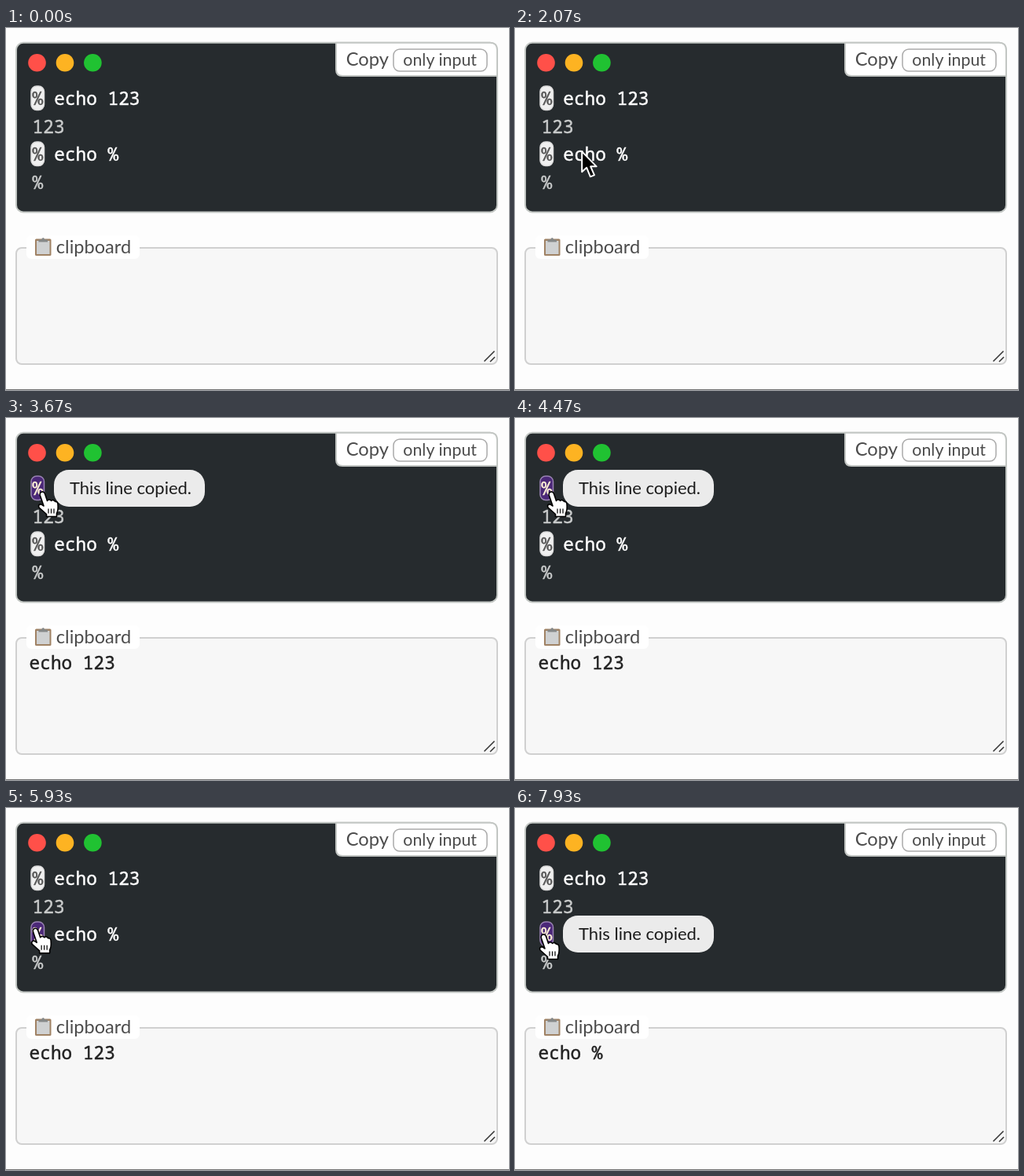
Recreate the animation shown at these times as an HTML page. Size 640 by 461 pixels, loop 8000 ms.

```html
<!DOCTYPE html>
<html lang="en">
<head>
<meta charset="utf-8">
<title>Copy a console line</title>
<style>
  html, body { margin: 0; width: 100%; height: 100%; overflow: hidden; background: #fdfdfd; }
  svg { display: block; width: 100%; height: 100%; }
  text { font-family: Lato, sans-serif; fill: #4c4c4c; white-space: pre; }
  .mono { font: 22.75px "Noto Sans Mono", "DejaVu Sans Mono", monospace; stroke-width: .45; }
  .command { fill: #fff; stroke: #fff; }
  .output { fill: #c9cbcb; stroke: #c9cbcb; }
  .copied { fill: #222; stroke: #222; }
  .prompt rect { fill: #f0f0f0; stroke: #dcdcdc; stroke-width: 1.5; }
  .prompt text { fill: #555; stroke: #555; }
  .prompt.hover rect { fill: #4b2878; stroke: #9a83b4; }
  .prompt.hover text { fill: #fff3d8; stroke: #fff3d8; }
</style>
</head>
<body>
<svg viewBox="0 0 640 461">
  <rect width="640" height="461" fill="#fdfdfd"/>
  <path d="M0 460.5H640" stroke="#747474"/>

  <!-- Console -->
  <rect x="13" y="18.8" width="612" height="215.6" rx="9" fill="#262b2e" stroke="#c2c6c3" stroke-width="2"/>
  <circle cx="39.5" cy="44.3" r="11.3" fill="#ff5049"/>
  <circle cx="75" cy="44.3" r="11.3" fill="#fdb322"/>
  <circle cx="110.4" cy="44.3" r="11.3" fill="#20c232"/>
  <path d="M420 18.8H616Q625 18.8 625 28V61H428Q420 61 420 53Z" fill="#fff" stroke="#c2c6c3" stroke-width="2"/>
  <text x="432.7" y="48.3" font-size="23.7">Copy</text>
  <rect x="493" y="27" width="119" height="28" rx="8" fill="#fff" stroke="#aaa" stroke-width="1.5"/>
  <text x="505.3" y="48" font-size="21.4">only input</text>

  <g class="prompt">
    <rect x="32" y="74" width="16.5" height="30.5" rx="7"/>
    <text class="mono" x="33.6" y="98">%</text>
  </g>
  <text class="mono command" x="61.3" y="98">echo 123</text>
  <text class="mono output" x="33.6" y="133.5">123</text>
  <g class="prompt">
    <rect x="32" y="145" width="16.5" height="30.5" rx="7"/>
    <text class="mono" x="33.6" y="169">%</text>
  </g>
  <text class="mono command" x="61.3" y="169">echo %</text>
  <text class="mono output" x="33.6" y="204.5">%</text>

  <!-- Clipboard -->
  <rect x="13" y="280" width="612" height="148" rx="7" fill="#f7f7f7" stroke="#d0d0d0" stroke-width="2"/>
  <path d="M608.5 424.5L621.5 411.5M616 425L622 419" stroke="#333" stroke-width="1.5"/>
  <rect x="26" y="264" width="144" height="30" rx="6" fill="#fff"/>
  <rect x="37" y="268.5" width="20.5" height="21.5" rx="1.5" fill="#a08264"/>
  <rect x="39" y="271" width="16.5" height="17" fill="#cfd1d2"/>
  <path d="M41.5 272.5V269.5H45Q47.2 264.5 49.5 269.5H53V272.5Z" fill="#858888"/>
  <text x="63.8" y="286.5" font-size="23.6">clipboard</text>
  <text id="clipboard" class="mono copied" x="29.6" y="320"></text>

  <g id="tooltip">
    <rect x="61" y="66" width="192" height="47" rx="19" fill="#ebebeb"/>
    <text x="81" y="97" font-size="22" style="fill:#1c1c1c">This line copied.</text>
  </g>

  <path id="arrow" d="M0 0V26L6 20.5L10.7 32L15.8 30L11 19H18.5Z"
    fill="#000" stroke="#fff" stroke-width="2" stroke-linejoin="round"/>
  <g id="hand" stroke="#000" stroke-width="1.6" stroke-linejoin="round">
    <path fill="#fff" d="M-3 3C-4.5 -2 1 -4 3 .5L6 9.5C7 7.5 10 7.5 11 9.5C12.5 7.8 15 8.5 16 10.5C18 10 19.5 11.5 19.5 14C20 19 20 22 18 25.5V29.5H5V26.5L-4.5 18C-6 14.5 -3 12.5 0 15L1.5 16Z"/>
    <path fill="none" stroke-width="1.2" d="M7.5 19.5V25.5M11 19.5V25.5M14.5 19.5V25.5"/>
  </g>
</svg>
<script>
const LOOP = 8000, STEP = 200 / 3;
const ENTER = 1400, FADE = 260, TOOLTIP_LIFE = 1960;
const clicks = [
  { time: 3400, text: "echo 123", shift: 0 },
  { time: 6667, text: "echo %", shift: 71 },
];

const byId = id => document.getElementById(id);
const [clipboard, tooltip, arrow, hand] = ["clipboard", "tooltip", "arrow", "hand"].map(byId);
const prompts = [...document.querySelectorAll(".prompt")];

const clamp = v => Math.min(1, Math.max(0, v));
const easeOut = (from, to, p, power = 2) => to + (from - to) * (1 - p) ** power;

function pointerAt(t) {
  if (t < 5530) {
    const p = clamp((t - ENTER) / 1155);
    return [easeOut(245, 46.5, p, 1.9), easeOut(470, 96, p, 2.1)];
  }
  const p = clamp((t - 5530) / 609);
  return [easeOut(46.5, 36.5, p), easeOut(96, 163, p)];
}

function place(node, x, y, visible) {
  node.setAttribute("transform", `translate(${x} ${y})`);
  node.setAttribute("visibility", visible ? "visible" : "hidden");
}

function draw(t) {
  const [x, y] = pointerAt(t);
  const hovered = [73, 144].findIndex(top => x >= 31 && x <= 49.5 && y >= top && y <= top + 32);
  prompts.forEach((prompt, i) => prompt.classList.toggle("hover", i === hovered));
  place(arrow, x, y, t >= ENTER && hovered < 0);
  place(hand, x, y, hovered >= 0);

  const click = clicks.filter(c => c.time <= t).pop();
  clipboard.textContent = click ? click.text : "";
  const age = click ? t - click.time : 0;
  const opacity = Math.min(clamp(age / FADE), clamp((TOOLTIP_LIFE - age) / FADE));
  tooltip.setAttribute("opacity", opacity);
  place(tooltip, 0, click ? click.shift : 0, opacity > 0);
}

const start = performance.now();
function tick() {
  const t = (performance.now() - start) % LOOP;
  draw(Math.floor(t / STEP + 0.05) * STEP);
  requestAnimationFrame(tick);
}
tick();
</script>
</body>
</html>
```
